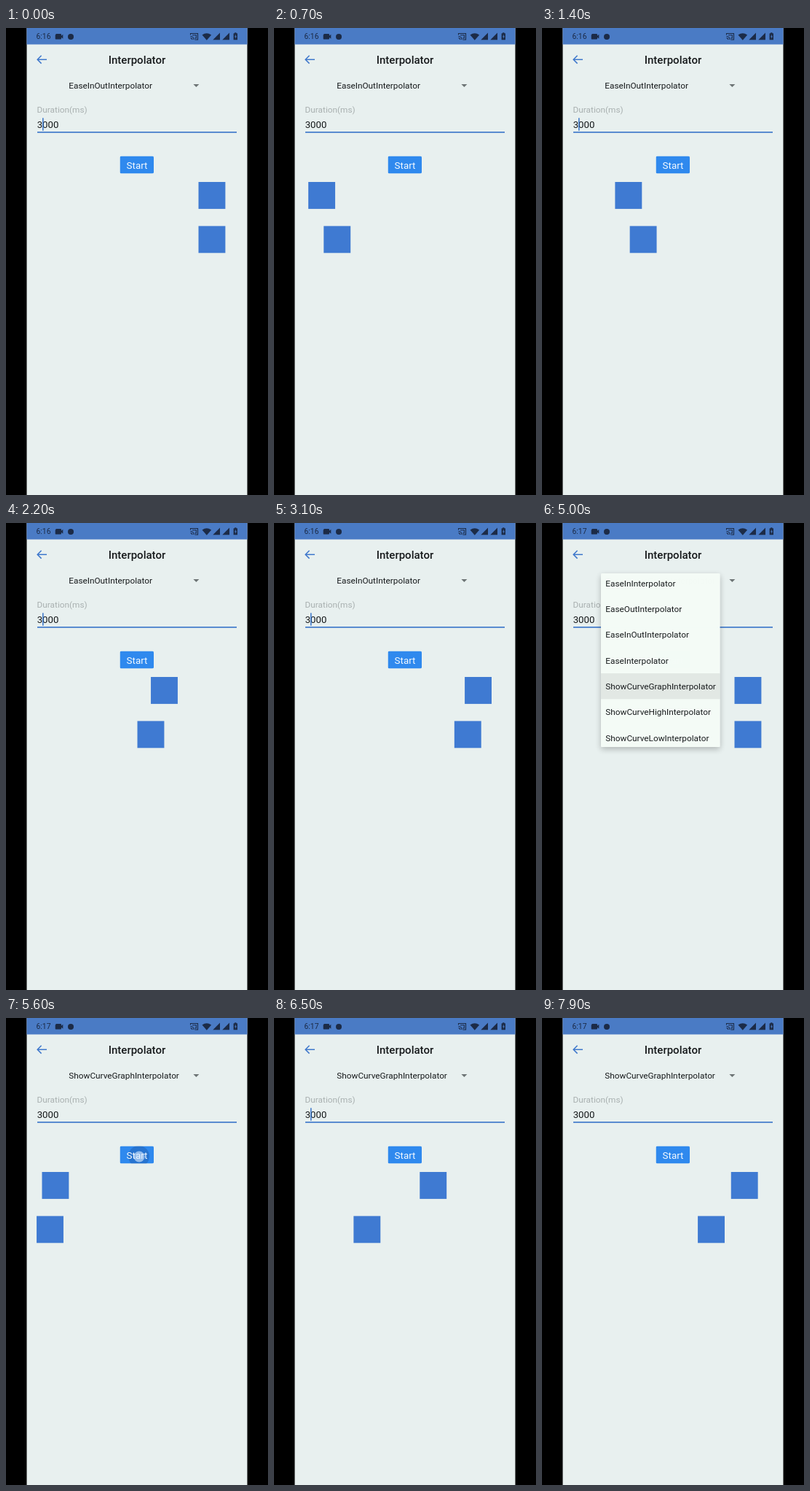
Animation, 360 px wide and 640 px high, one loop 8 s. Source, as an HTML page:

```html
<!DOCTYPE html>
<html lang="en">
<head>
<meta charset="utf-8">
<title>Interpolator</title>
<style>
  html, body { margin: 0; width: 100%; height: 100%; overflow: hidden; background: #000; }
  svg { display: block; width: 100vw; height: 100vh; }
  text { font-family: Roboto, "Open Sans", sans-serif; fill: #16191b; }
</style>
</head>
<body>
<svg viewBox="0 0 360 640">
  <defs>
    <clipPath id="buttonClip"><rect x="156.5" y="175.5" width="46.5" height="24" rx="2"/></clipPath>
    <clipPath id="menuClip"><rect id="menuReveal" x="60" y="50" width="206" height="300"/></clipPath>
    <filter id="shadow" x="-20%" y="-20%" width="140%" height="140%">
      <feDropShadow dx="0" dy="3" stdDeviation="4" flood-color="#000" flood-opacity=".25"/>
    </filter>
  </defs>
  <rect width="360" height="640"/>
  <rect x="28.5" width="303" height="640" fill="#e8f0ef"/>
  <rect x="28.5" width="303" height="22.5" fill="#4a7bc5"/>

  <!-- status bar -->
  <g fill="#1c2b47">
    <text id="clock" x="41.5" y="15.4" font-size="10.4" style="fill:#1c2b47"></text>
    <path d="M68.5 8h6.5q1 0 1 1v1.7l2.3-2v6l-2.3-2v1.7q0 1-1 1h-6.500q-.8 0-.8-1v-4.400q0-1 .8-1z"/>
    <circle cx="89" cy="12" r="4"/>
    <path d="M253.500 9.500v-2h10v8.500h-4M253.500 11.500q4.500 0 4.500 4.500M253.500 13.700q2.300 0 2.300 2.300M256 9.700h5.300v4.300h-2" fill="none" stroke="#1c2b47" stroke-width="1.100"/>
    <path d="M269.500 9.500q6.300-4.700 12.600 0l-6.300 7.300z"/>
    <path d="M294 6.500v9.700h-9.700zM307 6.500v9.700h-9.700z"/>
    <path d="M314.200 7.300v-1.100h2.200v1.100h1.200q.4 0 .4.500v8q0 .5-.4.500h-4.600q-.4 0-.4-.5v-8q0-.5.4-.5z"/>
    <path d="M315.800 8.800l-1.700 3.500h1.100v2.500l1.700-3.500h-1.100z" fill="#4a7bc5"/>
  </g>

  <path d="M56 43.200H43.300M48.600 37.800L43.200 43.200l5.400 5.400" fill="none" stroke="#3f78cc" stroke-width="1.500"/>
  <text x="180" y="49" font-size="15" font-weight="500" text-anchor="middle">Interpolator</text>

  <circle id="spinnerRipple" cx="261.300" cy="78.700" r="15" fill="#000"/>
  <text id="selected" x="86.300" y="83.200" font-size="11.800"></text>
  <path d="M257.400 77h8l-4 4z" fill="#6d7475"/>

  <text x="42.600" y="116" font-size="11.800" style="fill:#a9b0b0">Duration(ms)</text>
  <text x="42.700" y="137.200" font-size="13.200">3000</text>
  <rect x="43" y="142" width="274" height="1.700" fill="#427bcb"/>
  <rect id="cursor" x="50" y="123.300" width="1.600" height="17.400" fill="#427bcb"/>

  <g clip-path="url(#buttonClip)">
    <rect x="156.500" y="175.500" width="46.500" height="24" fill="#2f89ee"/>
    <circle id="buttonRipple" cx="182.500" cy="189.500" fill="#0a2c66"/>
  </g>
  <text x="180" y="192.600" font-size="13.400" text-anchor="middle" style="fill:#f4faff">Start</text>

  <rect id="eased" y="211" width="36.900" height="36.900" fill="#3f7ad2"/>
  <rect id="linear" y="271.400" width="36.900" height="36.900" fill="#3f7ad2"/>

  <g id="menu" clip-path="url(#menuClip)">
    <rect id="menuPanel" x="81" y="69" width="163.500" height="238" rx="1.500" fill="#f5fcf7" filter="url(#shadow)"/>
    <rect id="itemPress" x="81" y="206" width="163.500" height="35.300" fill="#000"/>
    <g id="items"></g>
  </g>
  <circle id="touch" r="7.500" fill="#dcecff"/>
</svg>
<script>
const LOOP = 8000, DURATION = 3000;
const FROM = 40.1, TRAVEL = 224.4;
const RUNS = [324, 5575];
const MENU_OPEN = 3780, MENU_CLOSE = 5000;
const $ = id => document.getElementById(id);
const set = (id, attrs) => {
  for (const key in attrs) $(id).setAttribute(key, attrs[key]);
};
const clamp = v => Math.min(1, Math.max(0, v));
const ramp = (t, start, length) => clamp((t - start) / length);

// CSS-style cubic bezier, solved by bisection
function bezier(x1, y1, x2, y2) {
  const at = (a, b, s) => 3 * a * s * (1 - s) ** 2 + 3 * b * s * s * (1 - s) + s ** 3;
  return x => {
    if (x <= 0 || x >= 1) return clamp(x);
    let lo = 0, hi = 1;
    for (let i = 0; i < 30; i++) {
      const mid = (lo + hi) / 2;
      if (at(x1, x2, mid) < x) lo = mid; else hi = mid;
    }
    return at(y1, y2, lo);
  };
}
const easeInOut = bezier(0.42, 0, 0.58, 1);
const curveGraph = bezier(0.1, 0.5, 0.33, 1);

const names = ["EaseIn", "EaseOut", "EaseInOut", "Ease", "ShowCurveGraph", "ShowCurveHigh", "ShowCurveLow"]
  .map(name => name + "Interpolator");
names.forEach((name, i) => {
  const item = document.createElementNS("http://www.w3.org/2000/svg", "text");
  item.setAttribute("x", 87.3);
  item.setAttribute("y", 86.5 + 35.35 * i);
  item.setAttribute("font-size", 11.8);
  item.textContent = name;
  $("items").append(item);
});

const taps = [
  { start: 200, end: 400, x: 183, y: 190 },
  { start: 3590, end: 3760, x: 262, y: 79 },
  { start: 4800, end: 4970, x: 165, y: 225 },
  { start: 5450, end: 5650, x: 183, y: 190 }
];

function drawSquares(t) {
  const second = t >= RUNS[1];
  let p = 1;
  if (t >= RUNS[0]) p = clamp((t - (second ? RUNS[1] : RUNS[0])) / DURATION);
  const ease = second ? curveGraph : easeInOut;
  set("eased", { x: FROM + TRAVEL * ease(p) });
  set("linear", { x: FROM + TRAVEL * p });
}

function drawButton(t) {
  const run = t > 3000 ? RUNS[1] : RUNS[0];
  const grow = ramp(t, run - 120, 420);
  const fade = 1 - ramp(t, run + 60, 260);
  set("buttonRipple", { r: 6 + 30 * grow * grow + 14 * grow, opacity: t < run - 120 ? 0 : 0.22 * fade });
}

function drawMenu(t) {
  const open = ramp(t, MENU_OPEN, 200);
  const shown = open * (1 - ramp(t, MENU_CLOSE, 150));
  set("menu", { opacity: shown, visibility: shown > 0 ? "visible" : "hidden" });
  set("menuReveal", { height: 120 + 180 * open });
  set("itemPress", { opacity: 0.08 * ramp(t, 4800, 100) });
  set("spinnerRipple", { opacity: 0.055 * ramp(t, 3600, 120) * (1 - ramp(t, 4130, 170)) });
}

function drawCursor(t) {
  const early = t < 3590;
  const phase = (t + (early ? 80 : 940)) % 1000;
  const focused = early || t > MENU_CLOSE + 100;
  set("cursor", { opacity: focused && phase < 495 ? 1 : 0 });
}

function drawTouch(t) {
  const tap = taps.find(({ start, end }) => t >= start && t < end);
  set("touch", tap ? { cx: tap.x, cy: tap.y, opacity: 0.6 } : { opacity: 0 });
}

function render(t) {
  const picked = t >= MENU_CLOSE;
  $("clock").textContent = picked ? "6:17" : "6:16";
  $("selected").textContent = names[picked ? 4 : 2];
  drawSquares(t);
  drawButton(t);
  drawMenu(t);
  drawCursor(t);
  drawTouch(t);
}

const began = performance.now();
function tick() {
  render((performance.now() - began) % LOOP);
  requestAnimationFrame(tick);
}
tick();
</script>
</body>
</html>
```
